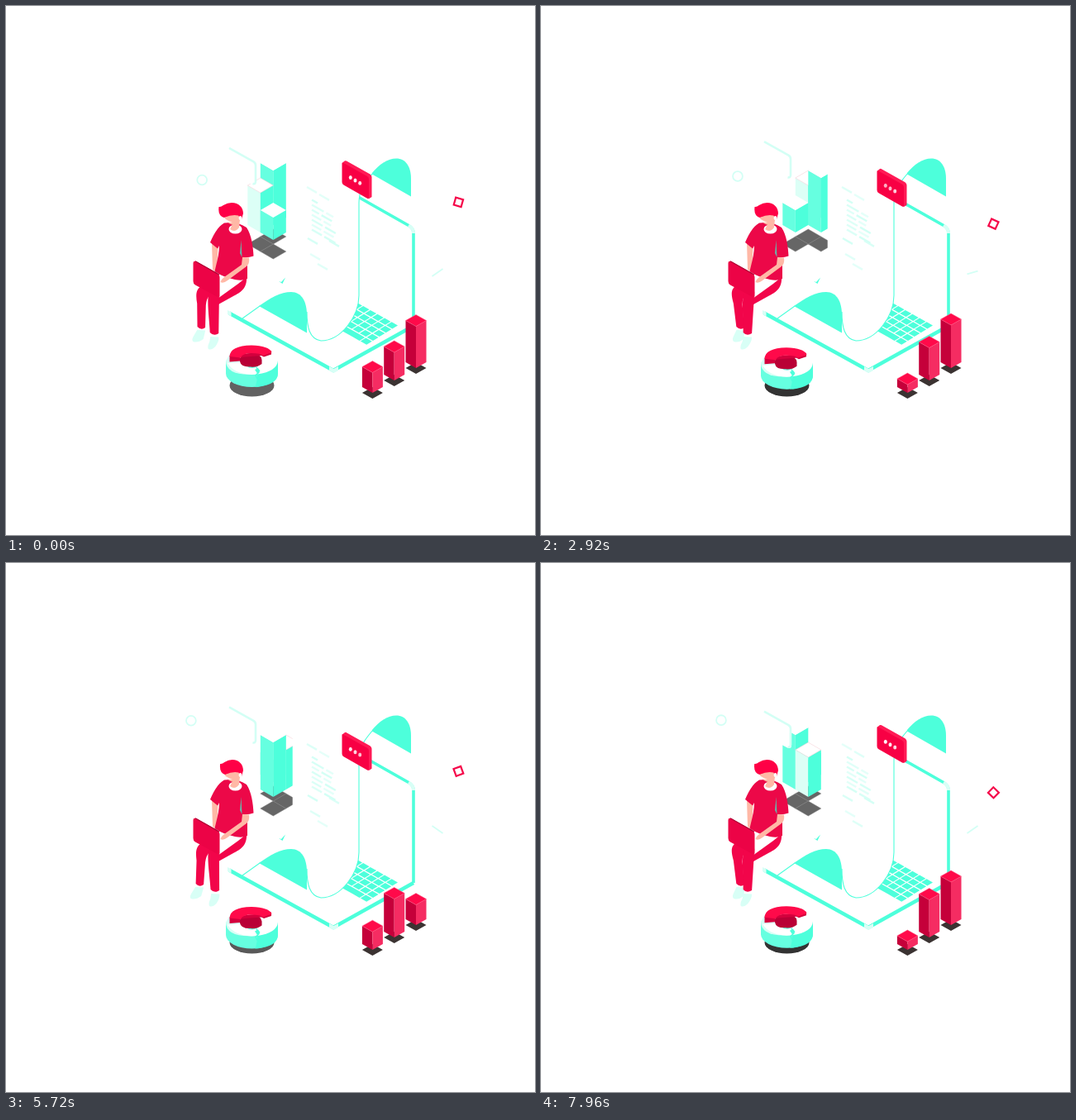
An HTML page for the animation above (8 s loop, 640 by 640 pixels).

```html
<!DOCTYPE html>
<html lang="en">
<head>
<meta charset="utf-8">
<title>Isometric workspace</title>
<style>
  html, body { margin: 0; width: 100%; height: 100%; overflow: hidden; background: #fff; }
  svg { display: block; width: 100%; height: 100%; }
  .mint { fill: #4dffdb; }
  .pale { fill: #d8fff6; }
  .red { fill: #f2054a; }
  .skin { fill: #ffb8a6; }
  .white { fill: #fff; }
  .line { fill: none; stroke: #4dffdb; }
  .soft { fill: none; stroke: #d3fff5; }
</style>
</head>
<body>
<svg viewBox="0 0 640 640">
  <defs>
    <clipPath id="wall"><rect x="280" y="160" width="66.7" height="160"/></clipPath>
  </defs>

  <circle id="ring" class="soft" r="5.9" stroke-width="1.8"/>

  <g clip-path="url(#wall)">
    <g id="tiles" fill="#666" stroke="#7d7d7d" stroke-width=".5"></g>
    <g id="blocks"></g>
  </g>

  <g id="panel">
    <path class="white" d="M268 170L300 188Q303 190 303 193V212Q303 217 298 215L268 199Z"/>
    <path class="soft" stroke-width="2.6" d="M270 171L299.5 187.500Q302 189 302 192V211Q302 215 298.500 214"/>
  </g>

  <path class="mint" d="M330 333L333 334L338 328.500L334.500 336Z"/>

  <!-- big laptop -->
  <path class="line" stroke-width="3.6" d="M427 231.500L487 265.500Q493 269 493 275V387"/>
  <path d="M487 265.500Q493 269 493 275" fill="none" stroke="#d8fff6" stroke-width="4.2"/>
  <path class="line" stroke-width="4.4" d="M270 371.500L396 441L493 387"/>
  <path class="pale" d="M268 368L272.500 370.500V375.500L268 373ZM391 436L396.500 439L402 436V441L396.500 444L391 441Z"/>
  <path id="keys" class="mint"/>

  <!-- rolling sheet -->
  <path class="mint" d="M442 203C452 191 462 184.500 472 184.500C484 184.500 490 195 490 209V230.500Z"/>
  <path class="white" d="M350 195L444 202C434 214 427 222 427 238V350C427 376 405 405 381 405C367 403 364 388 364 370L350 330Z"/>
  <path class="mint" d="M306 363C320 353 332 346 345 346C358 346 364 358 364 374V395.500Z"/>
  <path class="line" stroke-width="1.1" d="M286 378L307 363M444 202C434 214 427 222 427 238V350C427 376 405 405 381 405C367 403 364 388 364 370"/>
  <g id="text" class="soft" stroke-width="2.4"></g>

  <g id="chat">
    <path fill="#ff1a55" d="M406.500 190L410 187.300Q411 186.800 412 187.400L440.500 203.500Q442.500 205 442.500 207V231L439 233.300Z"/>
    <path fill="#f80044" d="M406.500 191Q406.500 188.800 408.500 190L437 206Q439 207.300 439 209.500V231.500Q439 234 437 232.700L408.500 216.500Q406.500 215.300 406.500 213Z"/>
    <g id="dots" fill="#fff">
      <ellipse cx="416.8" cy="207.5" rx="2" ry="2.5"/>
      <ellipse cx="422.5" cy="211" rx="2" ry="2.5"/>
      <ellipse cx="428.2" cy="214.2" rx="2" ry="2.5"/>
    </g>
  </g>

  <!-- person -->
  <g id="leg1">
    <path class="pale" d="M229 392L239 392.500L236 403Q229 408 223.500 406Q221.500 404 224 400Z"/>
    <path class="red" d="M240 337C230 341 229 348 230.500 360L229.500 388Q234 393 239 389L241 362Q242 354 246 350L258 346V338Z"/>
  </g>
  <g id="leg2">
    <path class="pale" d="M247 400L257 400.500Q258 405 253 412Q248 417 244.500 415Q243 412 246 406Z"/>
    <path class="red" d="M245 348C243 360 246 380 246.500 395Q251 400 257 396L258 346Z"/>
  </g>
  <path class="red" d="M256 354L281 336L291 328C292 342 283 347 275 351L257 361Z"/>
  <path class="white" d="M258 325L280 335L259 350Z"/>
  <path class="skin" d="M249 286L256.500 291L255 322L250 319Z"/>
  <path fill="#ec0848" d="M264 262.500Q280 260 291 268C297 277 299 291 299.500 302.500Q293 305 286 304L292 310V330Q286 333 277 331Q262 328 252.500 321C255 310 258 300 258 290L256 293.500L247 286C251 277 256 267 264 262.500Z"/>
  <path d="M284.500 283L283 299L285.500 304Z" fill="#66b8aa"/>
  <path class="skin" d="M286 304L294 304.500Q295 312 291 315L268 332Q263 336 259.500 334Q260 331 264 328L285 313Z"/>
  <path d="M226.500 311Q226.500 308 230 309L256 323.500Q258.500 325 258.500 328V351Q258 354 254 351L229 337.500Q226.500 336 226.500 333Z" fill="#ec0346"/>
  <path d="M229 308.800L257.800 325" fill="none" stroke="#b00034" stroke-width="1.2"/>
  <ellipse class="white" cx="277.500" cy="270" rx="8" ry="5.5"/>
  <path class="skin" d="M273 258L283 257L282 268Q277 275 271 270L274 264Z"/>
  <path class="skin" d="M264 251L284 250V258Q280 265 273 264.500Q266 262 264 254Z"/>
  <path class="white" d="M264 257Q269 260 274 262L267 261.500Z"/>
  <path id="hair" fill="#ff0046" d="M257.500 243Q260 243.500 263 241Q268 238 273 238C282 238 287 244 287 251L285 258L281 253.500Q273 252 264 256Q256 254 257.500 243Z"/>
  <ellipse class="white" cx="283.500" cy="256.500" rx="1.9" ry="2.5"/>

  <!-- ring chart -->
  <ellipse id="shade" cx="297.500" cy="459" rx="27" ry="13.500"/>
  <g id="donut">
    <path fill="#66ffe0" d="M266 429V444.500A31.500 16.500 0 0 0 329 444.500V429Z"/>
    <path class="mint" d="M304 444V461Q329 458 329 444.500V429Z"/>
    <path class="pale" d="M266 429L271 421L286 430L302 445.500Q266 448 266 429Z"/>
    <path class="white" d="M284 431Q289 438 298 438Q306 437 309 430L311 425L321 421Q329 424 329 429Q328 442 304 445.500L297 446Q276 445 268 432Z"/>
    <path class="line" stroke-width="1.5" d="M303 437L306 443L302 447L304.500 452L302.500 461"/>
    <path class="mint" d="M301 440L305 438L307.500 441.500L304 444.500Z"/>
    <path fill="#b90036" d="M283 426Q285 420 297 420Q309 421 309.500 428V433Q302 438 296 436.500Q284 437 283 430Z"/>
    <path fill="#d4003d" d="M270.500 423V430.500L283 429.500V425L309 423L312 424.500L321 421.500V417Z"/>
    <path fill="#ff0a4a" d="M270.500 424Q271 411 297 410.500Q318 411 321.500 419L311 423Q308 420 297 420Q286 420 284 425.500Z"/>
  </g>

  <g id="columns"></g>
  <line id="dash" class="soft" x1="515.5" x2="528.5" stroke-width="1.8"/>
  <rect id="square" x="-4.6" y="-4.6" width="9.2" height="9.2" fill="none" stroke="#f5084a" stroke-width="2.2"/>
</svg>

<script>
const LOOP = 8000;
const FLOAT = 10300;  // slow drifting
const BEAT = 5040;    // legs and charts
const SLOPE = .57;

const $ = id => document.getElementById(id);
const add = (parent, tag, attrs = {}) => {
  const el = document.createElementNS('http://www.w3.org/2000/svg', tag);
  for (const k in attrs) el.setAttribute(k, attrs[k]);
  return parent.appendChild(el);
};
const move = (id, x, y, extra = '') => $(id).setAttribute('transform', `translate(${x} ${y})${extra}`);
const poly = pts => 'M' + pts.map(p => p[0].toFixed(2) + ' ' + p[1].toFixed(2)).join('L') + 'Z';
const rhomb = (x, y, w, h) => poly([[x - w, y], [x, y - h], [x + w, y], [x, y + h]]);

const ease = p => (1 - Math.cos(Math.PI * Math.min(1, Math.max(0, p)))) / 2;
const wave = (t, period, peak) => Math.cos(2 * Math.PI * (t - peak) / period);
const swing = (t, from, to, period, start) => from + (to - from) * (1 - wave(t, period, start)) / 2;
const bump = (t, mid, width) => Math.exp(-(((t - mid) / width) ** 2));

let seed = 7;
const random = () => (seed = seed * 16807 % 2147483647) / 2147483647;

function makePrism(parent, colors, edge = 'none') {
  const g = add(parent, 'g');
  const [left, right, top] = colors.map(fill => add(g, 'path', { fill }));
  top.setAttribute('stroke', edge);
  top.setAttribute('stroke-width', .5);
  return { g, left, right, top };
}
function drawPrism(p, x, top, base, w, h) {
  p.left.setAttribute('d', poly([[x - w, top], [x, top + h], [x, base + h], [x - w, base]]));
  p.right.setAttribute('d', poly([[x + w, top], [x, top + h], [x, base + h], [x + w, base]]));
  p.top.setAttribute('d', rhomb(x, top, w, h));
}

// Three blocks take turns sliding into the free cell of a 2 x 2 board
const HALF_W = 15.5, HALF_H = 9, SLIDE = 600;
const cell = (col, row) => ({ x: 323.3 + (col - row) * HALF_W, y: 256 + (col + row) * HALF_H });
const LOOPED = [cell(0, 0), cell(1, 0), cell(1, 1), cell(0, 1)];
const blocks = [
  { height: 66, left: '#66ffe0', at: 0, starts: [200, 3000, 6354] },
  { height: 48, left: '#dcfff6', at: 3, starts: [1100, 3900, 7200], edge: '#f3c9d0' },
  { height: 27, left: '#66ffe0', at: 2, starts: [2000, 4900] }
];
for (const b of blocks) {
  b.tile = add($('tiles'), 'path');
  b.prism = makePrism($('blocks'), [b.left, '#4dffdb', '#fff'], b.edge);
}
function drawBlocks(t) {
  for (const b of blocks) {
    const pos = b.starts.reduce((sum, s) => sum + ease((t - s) / SLIDE), b.at);
    const a = LOOPED[Math.floor(pos) % 4], c = LOOPED[Math.ceil(pos) % 4], p = pos % 1;
    const x = a.x + (c.x - a.x) * p;
    b.y = a.y + (c.y - a.y) * p;
    b.tile.setAttribute('d', rhomb(x, b.y + 23, HALF_W, HALF_H));
    drawPrism(b.prism, x, b.y - b.height, b.y, HALF_W, HALF_H);
  }
  [...blocks].sort((a, b) => a.y - b.y).forEach(b => $('blocks').appendChild(b.prism.g));
}

// Columns, back to front
const heights = [
  t => 52 - 29 * bump(t, 5900, 800) - 5 * bump(t, 860, 800),
  t => swing(t, 34, 47, 13000, 0),
  t => swing(t, 24.5, 9, BEAT, 0)
];
const columns = heights.map((height, i) => {
  const x = 496 - 26.3 * i, base = 431 + 15 * i;
  add($('columns'), 'path', { fill: '#3b3332', d: rhomb(x, base + 7, 12.5, 7) });
  return { x, base, height, prism: makePrism($('columns'), ['#c5003a', '#f52c62', '#ff0a4a'], '#ff5580') };
});

// Keyboard
let keys = '';
for (let r = 0; r < 5; r++) for (let i = 0; i < 7; i++) {
  const x = 474 - 7.8 * r - 8.6 * i, y = 386.5 + 4.8 * r - 4.8 * i;
  const w = r === 4 && i % 3 ? 8.6 : 7.4, h = w * SLOPE;
  keys += poly([[x, y], [x - w, y - h], [x - w - 6.6, y - h + 4], [x - 6.6, y + 4]]);
}
$('keys').setAttribute('d', keys);

// Text on the sheet: a paragraph and a few loose words
const dashes = [];
const word = (x, y, n) =>
  dashes.push(add($('text'), 'line', { x1: x, y1: y, x2: x + n, y2: y + n * SLOPE }));
for (let i = 0; i < 7; i++) {
  const y = 234.5 + 6 * i, n = 7 + 8 * random();
  word(370, y, n);
  if (i) word(373 + n, y + (n + 3) * SLOPE, 6 + 9 * random());
}
[[364, 219], [379, 228], [391, 284], [365, 281], [368, 300], [377, 312]].forEach(([x, y]) => word(x, y, 12));

function drawLeg(id, shift, knee) {
  const k = shift / 46;
  $(id).setAttribute('transform', `matrix(1 0 ${k} 1 ${-k * knee} 0)`);
}

function draw(t) {
  move('ring', 241 - .0024 * t + 4 * wave(t, 2000, 900), 209 - .0026 * t + 5 * wave(t, 4000, 3200));
  move('panel', 0, swing(t, -7, 8.6, FLOAT, 2600));
  drawBlocks(t);

  move('chat', 0, swing(t, 0, 18, FLOAT, 200));
  [...$('dots').children].forEach((d, i) => d.setAttribute('opacity', .82 + .14 * wave(t, 2000, 200 * i)));
  dashes.forEach((d, i) => d.setAttribute('opacity', .8 + .2 * wave(t, 2700, 700 * i)));

  drawLeg('leg1', swing(t, 0, 8, BEAT, 880), 345);
  drawLeg('leg2', swing(t, 1.2, -2.3, BEAT, 880), 352);
  const bang = swing(t, 0, 1.6, FLOAT, 0) / 28;
  $('hair').setAttribute('transform', `matrix(${1 - bang} 0 0 1 ${287 * bang} 0)`);

  move('donut', 0, swing(t, 0, 5.6, 13000, -200));
  const gray = Math.round(swing(t, 48, 98, BEAT, 2500));
  $('shade').setAttribute('fill', `rgb(${gray},${gray},${gray})`);

  for (const c of columns) drawPrism(c.prism, c.x, c.base - c.height(t), c.base, 12.5, 7);

  const tilt = 4.5 * Math.tanh(2.5 * wave(t, 4200, 3850));
  $('dash').setAttribute('y1', 322.5 + tilt);
  $('dash').setAttribute('y2', 322.5 - tilt);
  move('square', 547.4, 245.5 + .0028 * t + 10 * wave(t, 5000, 3000),
    ` rotate(${swing(t, 6, 70, 9400, 1200)})`);
}

const start = performance.now();
function tick() {
  draw((performance.now() - start) % LOOP);
  requestAnimationFrame(tick);
}
draw(0);
requestAnimationFrame(tick);
</script>
</body>
</html>
```
